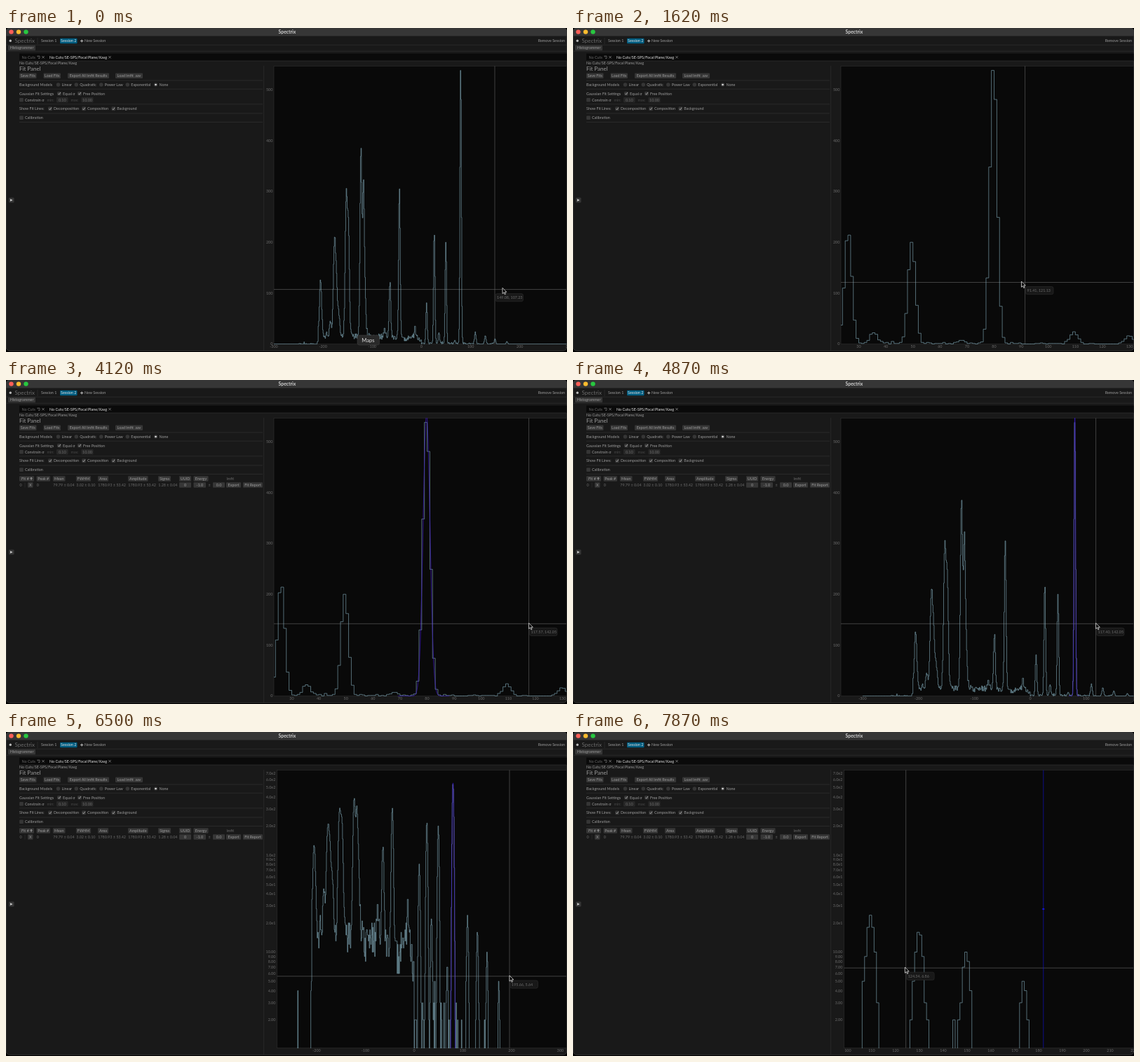
Animation, 800 px wide and 463 px high, one loop 8000 ms. Source, as an HTML page:

```html
<!DOCTYPE html>
<html lang="en">
<head>
<meta charset="utf-8">
<title>Spectrum viewer</title>
<style>
html, body { margin: 0; width: 100%; height: 100%; overflow: hidden; background: #000; }
svg { display: block; width: 100%; height: 100%; }
text { font: 5.4px Lato, "Open Sans", sans-serif; fill: #9c9c9c; white-space: pre; }
.mid { text-anchor: middle; }
.end { text-anchor: end; }
.head { font-size: 8px; }
.dim { fill: #6c6c6c; }
.faint { fill: #484848; }
.hi { fill: #e4e4e4; }
.rule { stroke: #343434; stroke-width: .6; }
.line { fill: none; stroke-linejoin: round; }
</style>
</head>
<body>
<svg viewBox="0 0 800 463" preserveAspectRatio="none">
  <defs><clipPath id="clip"><rect id="clipRect" y="54.3" height="397.6"/></clipPath></defs>
  <g id="ui"></g>
  <g id="table"></g>
  <rect id="area" y="54.5" height="397" fill="#090909" stroke="#303030" stroke-width=".6"/>
  <g id="ticks"></g>
  <g clip-path="url(#clip)">
    <path id="cross" class="line" stroke="#707070" stroke-width=".55"/>
    <path id="hist" class="line" stroke="#86b0c0" stroke-width=".6"/>
    <g id="fit">
      <path class="line" stroke="#a010b0" stroke-width=".7" opacity=".4"/>
      <path class="line" stroke="#2020d8" stroke-width=".6" opacity=".85"/>
    </g>
    <g id="marks"></g>
  </g>
  <g id="tip">
    <rect x="1" y="6" width="39.5" height="11.2" rx="2.5" fill="#181818" stroke="#333" stroke-width=".5"/>
    <text id="coords" x="3" y="13.5" class="dim"></text>
  </g>
  <path id="arrow" d="M0-1V7.2L1.9 5.5 3.2 8.4 4.5 7.8 3.2 5H5.8Z" fill="#000" stroke="#fff" stroke-width=".7"/>
  <g id="dock">
    <rect x="501" y="439" width="31.5" height="14" rx="3" fill="#292929" stroke="#454545" stroke-width=".5"/>
    <text x="516.5" y="448.8" class="mid" style="font-size:7.6px;fill:#ddd">Maps</text>
  </g>
</svg>
<script>
const $ = id => document.getElementById(id);
const setAll = (id, attrs) => Object.entries(attrs).forEach(([k, v]) => $(id).setAttribute(k, v));
const show = (id, on) => $(id).style.display = on ? '' : 'none';

// ---------- interface ----------
const text = (x, y, s, cls = '') => `<text x="${x}" y="${y + 1.9}" class="${cls}">${s}</text>`;
const box = (x, y, w, h, fill, rx = 1) =>
  `<rect x="${x}" y="${y}" width="${w}" height="${h}" rx="${rx}" fill="${fill}"/>`;
const button = (x, end, y, s, cls = '', fill = '#363636') =>
  box(x, y - 3.8, end - x, 7.6, fill) + text((x + end) / 2, y, s, 'mid ' + cls);
const disc = (x, y, r, fill) => `<circle cx="${x}" cy="${y}" r="${r}" fill="${fill}"/>`;
const rule = (x1, y1, x2, y2) => `<path class="rule" d="M${x1} ${y1}L${x2} ${y2}"/>`;
const icon = (d, color = '#aaa', width = .6) =>
  `<path class="line" d="${d}" stroke="${color}" stroke-width="${width}"/>`;
const close = x => icon(`M${x - 1.7} 40l3.4 3.4m0-3.4l-3.4 3.4`);
const check = (x, y, s, on = true) => box(x - 2.8, y - 2.8, 5.6, 5.6, '#363636') +
  (on ? icon(`M${x - 1.6} ${y}l1.2 1.5 2.2-3.2`, '#ccc', .7) : '') + text(x + 5, y, s);
const radio = (x, s, on) => disc(x, 81, 2.8, '#363636') + (on ? disc(x, 81, 1.3, '#ddd') : '') +
  text(x + 5, 81, s);
const path = 'No Cuts/SE-SPS/Focal Plane/Xavg';

$('ui').innerHTML = [
  `<rect x=".3" y="0" width="799.4" height="461.3" rx="5" fill="#191919" stroke="#4a4a4a" stroke-width=".6"/>`,
  `<path d="M0 11.5V5Q0 0 5 0H795Q800 0 800 5V11.5Z" fill="#363636"/>`,
  ...['#ff5f57', '#febc2e', '#28c840'].map((c, i) => disc(7.5 + 10.5 * i, 5.6, 3.2, c)),
  `<text x="401" y="7.9" class="mid" style="font-size:6.8px;font-weight:700;fill:#d0d0d0">Spectrix</text>`,
  disc(6.3, 18.3, 1.7, '#bbb'), text(12.5, 19.2, 'Spectrix', 'head dim'), rule(45, 14, 45, 23),
  text(50, 18.5, 'Session 1'), button(77, 101.5, 18.5, 'Session 2', 'hi', '#005c80'),
  icon('M106 18.5h4.2m-2.1-2.1v4.2', '#bbb', 1.1), text(112, 18.5, 'New Session'),
  text(797, 18.5, 'Remove Session', 'end'),
  rule(0, 24.2, 800, 24.2), button(3, 42, 28.5, 'Histogrammer'), rule(0, 33.2, 800, 33.2),
  box(19, 36.5, 780.5, 10.5, '#0a0a0a', 0), rule(19, 47, 799, 47),
  text(22.5, 41.7, 'No Cuts', 'dim'), icon('M44.5 40h3.5v3.5h-2m-1.5-3.5l2 2', '#888'), close(53),
  text(62, 41.7, path, 'hi'), close(148), text(19, 50, path), text(19, 59.5, 'Fit Panel', 'head'),
  button(19, 43.5, 68.3, 'Save Fits'), button(53.5, 78, 68.3, 'Load Fits'),
  button(88, 147, 68.3, 'Export All lmfit Results'), button(156, 195, 68.3, 'Load lmfit .sav'),
  ...[75, 87.3, 108.8, 122, 134.5].map(y => rule(19, y, 366, y)), rule(367.7, 54, 367.7, 461),
  text(19, 81, 'Background Models'), radio(74.5, 'Linear'), radio(100.3, 'Quadratic'),
  radio(135.8, 'Power Law'), radio(173.3, 'Exponential'), radio(213.5, 'None', true),
  text(19, 93.7, 'Gaussian Fit Settings'), check(76, 93.7, 'Equal σ'), check(105, 93.7, 'Free Position'),
  check(22, 102.8, 'Constrain σ', false), text(58.5, 102.8, 'min:', 'faint'),
  button(72, 88.5, 102.8, '0.10', 'dim', '#282828'), text(92.5, 102.8, 'max:', 'faint'),
  button(107.5, 124.5, 102.8, '10.00', 'dim', '#282828'),
  text(19, 115.4, 'Show Fit Lines:'), check(63, 115.4, 'Decomposition'),
  check(111, 115.4, 'Composition'), check(153.3, 115.4, 'Background'), check(22, 128.3, 'Calibration', false),
  box(4, 242.5, 7.5, 7, '#363636'), `<path d="M6 244.2v3.6l3.6-1.8z" fill="#ccc"/>`
].join('');

// Heading, its button's two edges, value below.
const columns = [
  ['Peak #', 43.5, 63, '0'], ['Mean', 67, 84.5, '79.79 ± 0.04'], ['FWHM', 100, 121, '3.02 ± 0.10'],
  ['Area', 131, 146, '1780.93 ± 53.42'], ['Amplitude', 174, 202.5, '1780.93 ± 53.42'],
  ['Sigma', 217, 235, '1.28 ± 0.04'], ['UUID', 247, 264, ''], ['Energy', 267.5, 288.5, '']
];
const tableHtml = stored => [
  button(19, 40, 141, 'Fit #   '), icon('M36 143v-3.4m-1.4 1.4l1.4-1.6 1.4 1.6', '#bbb', .8),
  ...columns.map(([name, x, end, value]) => button(x, end, 141, name) + text(x + .3, 150, value, 'dim')),
  stored ? text(19.5, 150, '0', 'dim') + rule(27, 146.5, 27, 153.5) + button(31, 38.5, 150, 'X')
         : text(19.5, 150, 'Temp', 'dim'),
  text(314.5, 141, 'lmfit', 'dim'), text(288.5, 150, '±', 'dim'),
  button(247, 264, 150, '0'), button(267.5, 285, 150, '-1.0'), button(295, 312, 150, '0.0'),
  button(314, 335, 150, 'Export'), button(338, 366, 150, 'Fit Report')
].join('');

// ---------- spectrum ----------
const FIT = { mean: 79.79, sigma: 1.28, area: 1780.93 };
const gauss = (x, mean, sigma) => Math.exp(-.5 * ((x - mean) / sigma) ** 2);
// Height by peak position; peaks broaden towards the left.
const peaks = Object.entries({
  '-205': 108, '-185': 30, '-177': 178, '-173': 105, '-168': 40, '-153': 270, '-148.5': 222,
  '-123': 370, '-117.7': 290, '-114': 60, '-75': 15, '-64': 112, '-44.7': 298, '-13': 25,
  '10.5': 80, '26.1': 222, '35.5': 22, '49.6': 200, '67.5': 5, '79.8': 550,
  '109.6': 23, '130': 16, '149.7': 10, '173.8': 5
}).map(([x, height]) => ({ x: +x, height, sigma: 1.35 + Math.max(0, -x) * .004 }));

const rand = n => { const v = Math.sin(n * 12.9898) * 43758.5453; return v - Math.floor(v); };
function poisson(mean, seed) {
  let n = 0;
  for (let p = rand(seed); p > Math.exp(-mean); p *= rand(seed + 613 * n)) n++;
  return n;
}
const background = x => x < -255 ? 0 : x < -210 ? .6 : x < 0 ? 11 - x * .03 : x < 110 ? 1 : x < 150 ? .3 : 0;
const FIRST = -300;
const counts = Array.from({ length: 600 }, (_, i) => {
  const x = FIRST + i + .5;
  const signal = peaks.reduce((sum, p) => sum + p.height * gauss(x, p.x, p.sigma), 0);
  return Math.round(signal) + poisson(background(x), i + 1);
});

// ---------- motion ----------
const STEP = 125, STEPS = 64, TOP = 54.3, BOTTOM = 451.5, RIGHT = 799;
const LOG_FROM = 6125, FIT_FROM = 2875, STORED_FROM = 3500, DOCK_UNTIL = 250;
const START_VIEW = [-300, 294.5];
const zooms = [
  { from: 750, to: 1375, view: [23.4, 131.4] },
  { from: 4250, to: 4750, view: [-338.8, 184.4] },
  { from: 5000, to: 5625, view: [-328.9, 286.1] },
  { from: LOG_FROM - 1, to: LOG_FROM, view: [-281.3, 312.2] },
  { from: 6625, to: 7250, view: [98.4, 219.7] }
];
const cursorKeys = [
  [0, 697, 373.6], [125, 720, 371], [750, 659, 370], [1375, 659, 368], [1625, 644.6, 363.5],
  [2625, 559, 356.2], [3375, 559, 356.2], [4125, 745.6, 348.3], [5125, 745.6, 348.3],
  [5750, 747.2, 352.8], [6375, 718, 349], [7250, 718, 349], [7500, 671, 345], [7875, 474.7, 337.2],
  [8000, 472, 337]
];
const markers = [
  { x: 88.4, from: 1875, to: STORED_FROM, color: '#1c1ce0', glow: .08 },
  { x: 79.9, from: 2250, to: STORED_FROM, color: '#e030e0', glow: .18 },
  { x: 69.1, from: 2625, to: STORED_FROM, color: '#2424d8', glow: .9 },
  { x: 182, from: 7500, to: 8000, color: '#1414d0', glow: .8 }
];

const mix = (a, b, p) => a + (b - a) * p;
function cursorAt(t) {
  const i = Math.max(1, cursorKeys.findIndex(k => k[0] >= t));
  const [t0, x0, y0] = cursorKeys[i - 1], [t1, x1, y1] = cursorKeys[i];
  const p = (t - t0) / (t1 - t0);
  return [mix(x0, x1, p), mix(y0, y1, p)];
}
// Each zoom runs at a constant rate about the point both ranges share.
function viewAt(t) {
  let [a, b] = START_VIEW;
  for (const { from, to, view } of zooms) {
    if (t <= from) break;
    const p = Math.min(1, (t - from) / (to - from));
    const before = b - a, after = view[1] - view[0], span = before * (after / before) ** p;
    a = mix(a, view[0], (before - span) / (before - after));
    b = a + span;
  }
  return [a, b];
}

function ticksHtml(a, b, left, log, px, py) {
  let out = '';
  const step = (RIGHT - left) / (b - a) * 10 > 28 ? 10 : 100;
  for (let v = Math.ceil((a - 1) / step) * step; px(v) < 803; v += step)
    if (px(v) > left - 1) out += text(px(v).toFixed(1), 454.6, v, 'mid dim');
  if (!log) for (let v = 0; v <= 500; v += 100) out += text(380.3, py(v), v, 'end dim');
  else for (let d = 0; d < 3; d++) for (let m = 1; m < 10; m++) {
    const v = m * 10 ** d;
    if (v > 1 && v <= 700) out += text(384.3, py(v), v <= 10 ? v.toFixed(2) : `${m}.0e${d}`, 'end dim');
  }
  return out;
}

function draw(t) {
  const log = t >= LOG_FROM, left = log ? 386.5 : 382;
  const [a, b] = viewAt(t), scale = (RIGHT - left) / (b - a);
  const px = v => left + (v - a) * scale;
  const py = v => !log ? BOTTOM - v * .7265 : v > 0 ? 314.5 + 138.5 * (1 - Math.log10(v)) : 600;
  const fitted = t >= FIT_FROM;

  for (const id of ['area', 'clipRect']) setAll(id, { x: left, width: RIGHT + .5 - left });
  $('ticks').innerHTML = ticksHtml(a, b, left, log, px, py);

  const steps = counts.map((n, i) => `V${py(n).toFixed(1)}H${px(FIRST + i + 1).toFixed(2)}`);
  setAll('hist', { d: `M${px(FIRST).toFixed(2)} ${py(0)}${steps.join('')}` });

  const points = [];
  for (let x = 69.2; x <= 88.4; x += .2) {
    const v = FIT.area / (FIT.sigma * Math.sqrt(2 * Math.PI)) * gauss(x, FIT.mean, FIT.sigma);
    points.push(`${px(x).toFixed(2)} ${py(v).toFixed(1)}`);
  }
  for (const line of $('fit').children) line.setAttribute('d', 'M' + points.join('L'));
  show('fit', fitted);
  $('table').innerHTML = fitted ? tableHtml(t >= STORED_FROM) : '';

  $('marks').innerHTML = markers.filter(m => t >= m.from && t < m.to).map(m =>
    `<path d="M${px(m.x)} ${TOP}V${BOTTOM}" stroke="${m.color}" stroke-width=".8" opacity="${m.glow}"/>` +
    `<ellipse cx="${px(m.x)}" cy="253" rx="1.7" ry="1.2" fill="${m.color}"/>`).join('');

  // The pointer runs slightly ahead of the crosshair.
  const [cx, cy] = cursorAt(t), [mx, my] = cursorAt(t + 60);
  const value = log ? 10 ** (1 + (314.5 - cy) / 138.5) : (BOTTOM - cy) / .7265;
  setAll('cross', { d: `M${cx} ${TOP}V${BOTTOM}M${left} ${cy}H${RIGHT}` });
  setAll('tip', { transform: `translate(${cx} ${cy})` });
  setAll('arrow', { transform: `translate(${mx} ${my})` });
  $('coords').textContent = `${(a + (cx - left) / scale).toFixed(2)}, ${value.toFixed(2)}`;
  show('dock', t < DOCK_UNTIL);
}

// The picture advances eight times a second.
let shown = -1;
const begin = performance.now();
function tick() {
  const step = Math.floor((performance.now() - begin + 5) / STEP) % STEPS;
  if (step !== shown) draw((shown = step) * STEP);
  requestAnimationFrame(tick);
}
tick();
</script>
</body>
</html>
```
